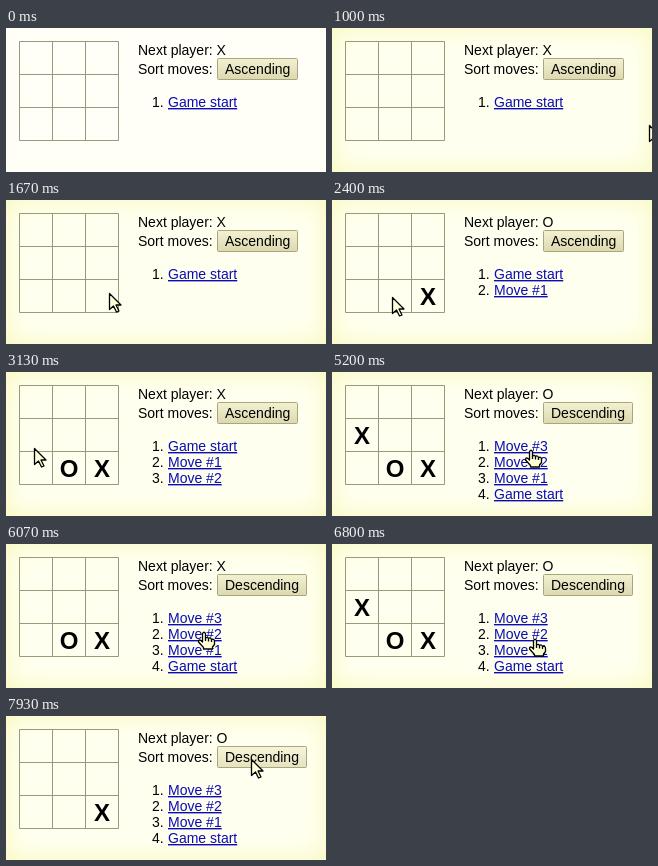
These frames come from a looping animation (320x144 px, 8000 ms). An HTML page:

```html
<!DOCTYPE html>
<html lang="en">
<head>
<meta charset="utf-8">
<title>Tic-tac-toe history</title>
<style>
  /* Whole numbers keep the pointer on the pixel grid */
  @property --x { syntax: "<integer>"; inherits: false; initial-value: 340; }
  @property --y { syntax: "<integer>"; inherits: false; initial-value: 97; }

  html, body { margin: 0; width: 100%; height: 100%; overflow: hidden; }
  svg {
    display: block; width: 320px; height: 144px;
    font: 14px "Liberation Sans", Arial, sans-serif;
  }

  /* Clock: 8 s loop, 15 ticks per second */
  svg, .t { animation: 8s step-end -5ms infinite; }
  svg { animation-name: paper; }

  .grid { fill: none; stroke: #99997c; }
  .mark { font-size: 24px; font-weight: bold; text-anchor: middle; }
  .num { text-anchor: end; }
  .link { fill: #0c0cb4; text-decoration: underline 1px; text-underline-offset: 1px; }
  .button { fill: url(#face); stroke: #a9a57c; }
  .hover { fill: #fffff0; animation-name: hover; }
  .cursor {
    animation-name: travel;
    transform: translate(calc(var(--x) * 1px), calc(var(--y) * 1px));
  }
  .cursor path { fill: #ffffd8; stroke: #000; stroke-width: 1.3; stroke-linejoin: round; }

  .first { animation-name: first; }
  .second { animation-name: second; }
  .third { animation-name: third; }
  .o8 { animation-name: o8; }
  .x4 { animation-name: x4; }
  .turn-x { animation-name: turn-x; }
  .turn-o { animation-name: turn-o; }
  .asc { animation-name: asc; }
  .desc { animation-name: desc; }
  .arrow { animation-name: arrow; }
  .hand { animation-name: hand; }

  @keyframes paper {
    0% { background: #fffff8; box-shadow: none; }
    2.5%, 100% { background: #fffff0; box-shadow: inset 0 0 26px #f8f8bc; }
  }
  @keyframes first { 0% { opacity: 0; } 23.333%, 100% { opacity: 1; } }
  @keyframes second { 0% { opacity: 0; } 32.5%, 100% { opacity: 1; } }
  @keyframes third { 0% { opacity: 0; } 41.666%, 100% { opacity: 1; } }
  @keyframes o8 { 0%, 90%, 100% { opacity: 0; } 32.5% { opacity: 1; } }
  @keyframes x4 {
    0%, 69.166%, 90%, 100% { opacity: 0; }
    41.666%, 80% { opacity: 1; }
  }
  @keyframes turn-x {
    0%, 32.5%, 69.166% { opacity: 1; }
    23.333%, 41.666%, 80%, 100% { opacity: 0; }
  }
  @keyframes turn-o {
    0%, 32.5%, 69.166% { opacity: 0; }
    23.333%, 41.666%, 80%, 100% { opacity: 1; }
  }
  @keyframes asc { 0% { opacity: 1; } 56.666%, 100% { opacity: 0; } }
  @keyframes desc { 0% { opacity: 0; } 56.666%, 100% { opacity: 1; } }
  @keyframes hover {
    0%, 62.5% { opacity: 0; }
    53.333%, 97.5%, 100% { opacity: .25; }
  }
  @keyframes arrow { 0%, 93.333%, 100% { opacity: 1; } 64.166% { opacity: 0; } }
  @keyframes hand { 0%, 93.333%, 100% { opacity: 0; } 64.166% { opacity: 1; } }

  /* Each leg advances once per tick */
  @keyframes travel {
    0% { --x: 340; --y: 97; }
    12.5% { --x: 317; --y: 97; animation-timing-function: steps(3); }
    15% { --x: 250; --y: 80; animation-timing-function: steps(3); }
    17.5% { --x: 165; --y: 74; animation-timing-function: steps(3); }
    20% { --x: 109; --y: 90; animation-timing-function: steps(3); }
    22.5% { --x: 92; --y: 100; }
    23.333% { --x: 92; --y: 100; animation-timing-function: steps(8); }
    30% { --x: 60; --y: 97; }
    32.5% { --x: 60; --y: 97; animation-timing-function: steps(5); }
    36.666% { --x: 36; --y: 82; animation-timing-function: steps(5); }
    40.833% { --x: 22; --y: 72; }
    42.5% { --x: 22; --y: 72; animation-timing-function: steps(4); }
    45.833% { --x: 171; --y: 52; }
    50% { --x: 189; --y: 56; animation-timing-function: steps(3); }
    52.5% { --x: 225; --y: 47; animation-timing-function: steps(4); }
    55.833% { --x: 243; --y: 43; }
    61.666% { --x: 243; --y: 43; animation-timing-function: steps(4); }
    65% { --x: 199; --y: 78; animation-timing-function: steps(4); }
    68.333% { --x: 199; --y: 92; animation-timing-function: steps(5); }
    72.5% { --x: 198; --y: 91; }
    75% { --x: 198; --y: 91; animation-timing-function: steps(5); }
    79.166% { --x: 200; --y: 78; }
    80% { --x: 200; --y: 78; animation-timing-function: steps(6); }
    85% { --x: 203; --y: 95; animation-timing-function: steps(2); }
    86.666% { --x: 206; --y: 109; }
    91.666% { --x: 206; --y: 109; animation-timing-function: steps(5); }
    95.833% { --x: 232; --y: 66; animation-timing-function: steps(4); }
    99.166%, 100% { --x: 245; --y: 43; }
  }
</style>
</head>
<body>
<svg viewBox="0 0 320 144">
  <defs>
    <linearGradient id="face" x2="0" y2="1">
      <stop stop-color="#f4f1d2"/>
      <stop offset="1" stop-color="#dcd8b0"/>
    </linearGradient>
  </defs>

  <path class="grid" d="M13.5 13.5h99v99h-99zM46.5 13.5v99M79.5 13.5v99M13.5 46.5h99M13.5 79.5h99"/>
  <g class="mark">
    <text class="t first" x="96" y="105">X</text>
    <text class="t o8" x="63" y="105">O</text>
    <text class="t x4" x="30" y="72">X</text>
  </g>

  <text class="t turn-x" x="132" y="27">Next player: X</text>
  <text class="t turn-o" x="132" y="27">Next player: O</text>
  <text x="132" y="46">Sort moves:</text>

  <g class="t asc">
    <rect class="button" x="211.5" y="30.5" width="80" height="21" rx="1"/>
    <rect class="t hover" x="212" y="31" width="79" height="20"/>
    <text x="219" y="46">Ascending</text>
    <g class="link">
      <text x="162" y="79">Game start</text>
      <text class="t first" x="162" y="95">Move #1</text>
      <text class="t second" x="162" y="111">Move #2</text>
      <text class="t third" x="162" y="127">Move #3</text>
    </g>
  </g>

  <g class="t desc">
    <rect class="button" x="211.5" y="30.5" width="89" height="21" rx="1"/>
    <rect class="t hover" x="212" y="31" width="88" height="20"/>
    <text x="219" y="46">Descending</text>
    <g class="link">
      <text x="162" y="79">Move #3</text>
      <text x="162" y="95">Move #2</text>
      <text x="162" y="111">Move #1</text>
      <text x="162" y="127">Game start</text>
    </g>
  </g>

  <g class="num">
    <text x="157.7" y="79">1.</text>
    <text class="t first" x="157.7" y="95">2.</text>
    <text class="t second" x="157.7" y="111">3.</text>
    <text class="t third" x="157.7" y="127">4.</text>
  </g>

  <g class="t cursor">
    <path class="t arrow" d="M.5 .5V16.5L4.5 13L7.5 19L10 18L7 12H12z"/>
    <g class="t hand">
      <path d="M-1.5 10V1.5Q0-1 1.5 1.5V6Q3.5 4.5 4.5 6.5Q6.5 5 7.5 7.5Q10.5 6.5 10.5 9.5V12.5L8.5 15V17H-.5V15.5L-5.5 10Q-5.5 7-3 8.5z"/>
      <path d="M1.5 6V9M4.5 6.5V9.5M7.5 7.5V10"/>
    </g>
  </g>
</svg>
</body>
</html>
```
